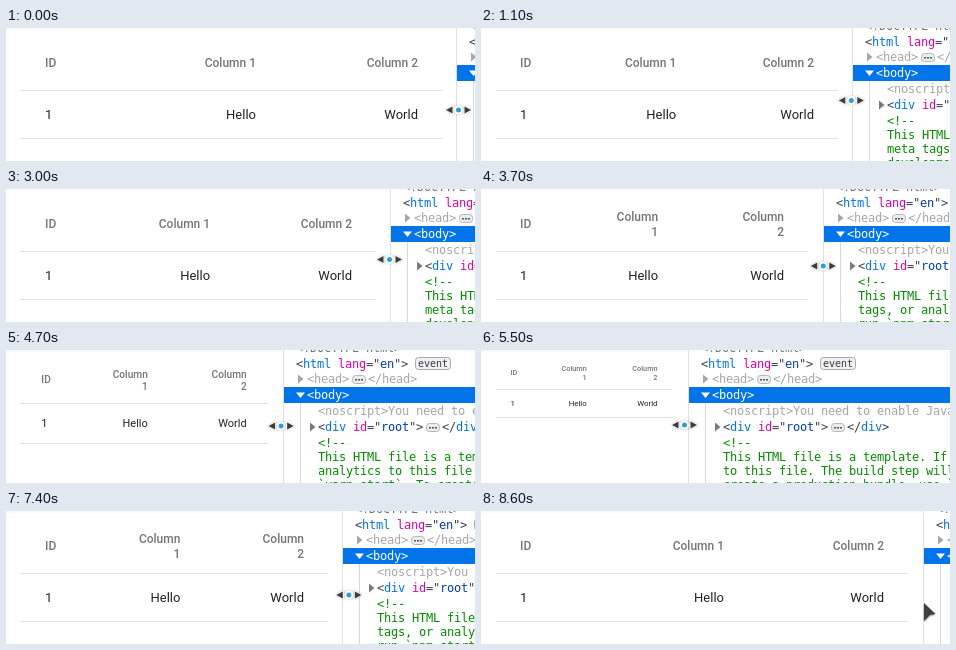
Write an HTML page with a canvas that moves like this. It is 469x133 px and loops after 9.1 s.

```html
<!DOCTYPE html>
<html lang="en">
<head>
<meta charset="utf-8">
<style>
html, body { margin: 0; width: 100%; height: 100%; overflow: hidden; background: #fff; }
canvas { display: block; }
</style>
</head>
<body>
<canvas id="stage" width="469" height="133"></canvas>
<script>
const ctx = document.getElementById('stage').getContext('2d');
const WIDTH = 469, HEIGHT = 133, LOOP = 9100, STEP = 100;
const SANS = 'Roboto, sans-serif', MONO = '"DejaVu Sans Mono", monospace';
const CHAR = 7, TABLE_LEFT = 15, MIN_TABLE = 291;

// [time, value] pairs
const DIVIDER = [[0, 450], [100, 450], [1100, 371], [1700, 333], [1900, 333], [2200, 353],
  [2900, 390], [3700, 342], [3900, 333], [4200, 312], [4300, 312], [5500, 207], [5600, 195],
  [5700, 195], [6300, 245], [7400, 336], [7700, 362], [8600, 442]];
const GAP = [[0, 14], [1900, 14], [2200, 11], [2700, 14], [3700, 15], [5500, 16], [6300, 14], [7400, 14], [8600, 15]];
const POINTER_Y = [[0, 82], [2200, 63], [3700, 77], [5500, 75], [6300, 77], [7400, 84], [8600, 92]];
// [table width, column width] pairs
const COLUMN = [[291, 117], [308, 124], [327, 133], [412, 160], [421, 162]];

const TAG = '#0074e8', ATTR = '#dd00a9', VALUE = '#003eaa', MARK = '#393f4c';
const DIM = '#a6a6a8', COMMENT = '#058b00';
const WORDS = ('This HTML file is a template. If you open it directly in the browser, you will see ' +
  'an empty page. You can add webfonts, meta tags, or analytics to this file. The build step will ' +
  'place the bundled scripts into the <body> tag. To begin the development, run `npm start` or ' +
  '`yarn start`. To create a production bundle, use `npm run build` or `yarn build`.').split(' ');

function lerpKeys(keys, x) {
  const i = keys.findIndex(k => k[0] > x);
  if (i === 0) return keys[0][1];
  if (i < 0) return keys[keys.length - 1][1];
  const [x0, y0] = keys[i - 1], [x1, y1] = keys[i];
  return y0 + (y1 - y0) * (x - x0) / (x1 - x0);
}

function text(str, x, y, color, font, align = 'left') {
  ctx.font = font;
  ctx.fillStyle = color;
  ctx.textAlign = align;
  ctx.fillText(str, x, y);
}

// Monospaced text on a whole-pixel character grid
function code(x, y, ...parts) {
  ctx.letterSpacing = '-0.224px';
  for (const [str, color] of parts) {
    text(str, x, y, color, '12px ' + MONO);
    x += str.length * CHAR;
  }
  ctx.letterSpacing = '0px';
}

function polygon(color, ...points) {
  ctx.fillStyle = color;
  ctx.beginPath();
  points.forEach(([x, y]) => ctx.lineTo(x, y));
  ctx.closePath();
  ctx.fill();
}

function disc(x, y, r, color) {
  ctx.fillStyle = color;
  ctx.beginPath();
  ctx.arc(x, y, r, 0, 2 * Math.PI);
  ctx.fill();
}

function badge(x, y, w, h, fill, stroke) {
  ctx.beginPath();
  ctx.roundRect(x + .5, y + .5, w - 1, h - 1, 3);
  ctx.fillStyle = fill;
  ctx.fill();
  ctx.strokeStyle = stroke;
  ctx.lineWidth = 1;
  ctx.stroke();
}

function ellipsis(x, y) {
  badge(x, y, 14, 9, '#ececee', '#b8b8ba');
  ctx.fillStyle = '#555';
  for (let i = 0; i < 3; i++) ctx.fillRect(x + 3 + i * 3, y + 4, 2, 1.5);
}

function twisty(x, y, color, open) {
  if (open) polygon(color, [x, y - 2.5], [x + 9, y - 2.5], [x + 4.5, y + 3]);
  else polygon(color, [x + 1, y - 4.5], [x + 6.5, y], [x + 1, y + 4.5]);
}

function drawTable(right) {
  const visible = right - TABLE_LEFT;
  const scale = Math.min(1, visible / MIN_TABLE);
  const width = Math.max(visible, MIN_TABLE);
  const top = 3 * (1 - scale);
  const col2 = width - 24, col1 = col2 - lerpKeys(COLUMN, width);
  const head = '500 12px ' + SANS, cell = '13px ' + SANS;

  ctx.save();
  ctx.translate(TABLE_LEFT, top);
  ctx.scale(scale, scale);
  text('ID', 24, 39, '#757575', head);
  text('1', 24, 91, '#212121', cell);
  [[col1, '1', 'Hello'], [col2, '2', 'World']].forEach(([x, n, value]) => {
    if (width < 319) {
      text('Column', x, 32, '#757575', head, 'right');
      text(n, x, 47, '#757575', head, 'right');
    } else {
      text('Column ' + n, x, 39, '#757575', head, 'right');
    }
    text(value, x, 91, '#212121', cell, 'right');
  });
  ctx.restore();

  ctx.fillStyle = '#dfdfdf';
  ctx.fillRect(TABLE_LEFT, Math.round(top + 62 * scale), visible, 1);
  ctx.fillRect(TABLE_LEFT, Math.floor(top + 110 * scale), visible, 1);
}

function wrapComment(columns) {
  const lines = [''];
  for (const word of WORDS) {
    const last = lines[lines.length - 1];
    if (!last) lines[lines.length - 1] = word;
    else if (last.length + 1 + word.length <= columns) lines[lines.length - 1] += ' ' + word;
    else lines.push(word);
  }
  return lines;
}

function openTag(name, attr, value) {
  return [['<', MARK], [name + ' ', TAG], [attr, ATTR], ['="', MARK], [value, VALUE], ['">', MARK]];
}

function drawInspector(x) {
  ctx.fillStyle = '#fff';
  ctx.fillRect(x, 0, WIDTH - x, HEIGHT);
  ctx.fillStyle = '#e0e0e2';
  ctx.fillRect(x, 0, 1, HEIGHT);
  ctx.fillStyle = '#d7d7db';
  ctx.fillRect(x + 17, 53, 1, HEIGHT - 53);
  ctx.fillStyle = '#0074e8';
  ctx.fillRect(x + 1, 37, WIDTH - x, 16);

  code(x + 13, 2, ['<!DOCTYPE html>', '#737373']);
  code(x + 13, 18, ...openTag('html', 'lang', 'en'));
  badge(x + 132, 7, 36, 13, '#f0f0f2', '#a8a8ab');
  text('event', x + 135, 17, '#38383d', '10px ' + MONO);

  twisty(x + 14, 29, DIM, false);
  code(x + 24, 33, ['<head>', DIM]);
  ellipsis(x + 69, 25);
  code(x + 85, 33, ['</head>', DIM]);

  twisty(x + 13, 45, '#fff', true);
  code(x + 24, 49, ['<body>', '#fff']);

  code(x + 35, 65, ['<noscript>You need to enable JavaScript to run this app.</noscript>', DIM]);

  twisty(x + 26, 77, '#7a7a7c', false);
  code(x + 35, 81, ...openTag('div', 'id', 'root'));
  ellipsis(x + 143, 73);
  code(x + 159, 81, ['</', MARK], ['div', TAG], ['>', MARK]);

  code(x + 35, 97, ['<!--', COMMENT]);
  const columns = Math.floor(145.5 - (x - 207) / CHAR);
  wrapComment(columns).slice(0, 3).forEach((line, i) => {
    code(x + 35, 111 + i * 14, [line, COMMENT]);
  });
}

function drawResizePointer(x, y) {
  ctx.save();
  ctx.shadowColor = 'rgba(0,0,0,.3)';
  ctx.shadowBlur = 2;
  disc(x, y, 4.5, '#fff');
  for (const side of [-1, 1]) {
    polygon('#fff', [x + side * 13.5, y], [x + side * 5, y - 5], [x + side * 5, y + 5]);
  }
  ctx.restore();
  for (const side of [-1, 1]) {
    polygon('#3c3c3c', [x + side * 12.5, y], [x + side * 6, y - 3.5], [x + side * 6, y + 3.5]);
  }
  disc(x, y, 2.5, '#2d9fd8');
}

function drawArrowPointer(x, y) {
  ctx.save();
  ctx.shadowColor = 'rgba(0,0,0,.4)';
  ctx.shadowBlur = 2;
  ctx.shadowOffsetY = 1;
  polygon('#3f3f41', [x, y], [x + 11.5, y + 11], [x + 6, y + 12], [x, y + 18]);
  ctx.restore();
}

function draw(now) {
  const t = Math.floor(now % LOOP / STEP) * STEP;
  const divider = Math.round(lerpKeys(DIVIDER, t));
  ctx.fillStyle = '#fff';
  ctx.fillRect(0, 0, WIDTH, HEIGHT);
  ctx.fillStyle = '#fafafa';
  ctx.fillRect(0, 0, divider, 2);
  drawTable(divider - Math.round(lerpKeys(GAP, t)));
  drawInspector(divider);
  // The pointer runs slightly ahead of the divider it drags
  if (t >= 8600) drawArrowPointer(443, 92);
  else drawResizePointer(lerpKeys(DIVIDER, t + 50) + 2.5, lerpKeys(POINTER_Y, t));
}

const start = performance.now();
function tick() {
  draw(performance.now() - start);
  requestAnimationFrame(tick);
}
tick();
</script>
</body>
</html>
```
